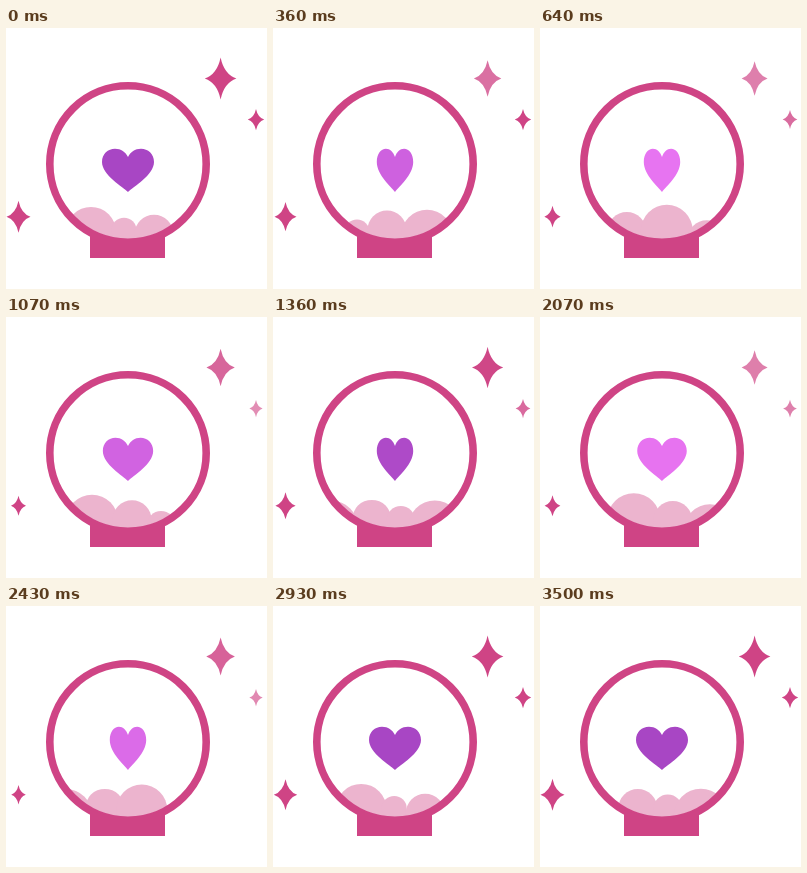
An HTML page for the animation above (3570 ms loop, 261x261 px).

```html
<!DOCTYPE html>
<html lang="en">
<head>
<meta charset="utf-8">
<title>Crystal ball</title>
<style>
  html, body { margin: 0; height: 100%; overflow: hidden; background: #fff; }
  svg { display: block; width: 100vw; height: 100vh; }
</style>
</head>
<body>
<svg viewBox="0 0 261 261" fill="#cf4485">
  <defs>
    <clipPath id="ball"><circle cx="122" cy="136" r="75"/></clipPath>
    <path id="star" d="M0-1Q.22-.2 1 0Q.22.2 0 1Q-.22.2-1 0Q-.22-.2 0-1Z"/>
  </defs>
  <g clip-path="url(#ball)">
    <g id="clouds" opacity=".4"><rect x="80" y="204" width="84" height="10"/></g>
  </g>
  <circle cx="122" cy="136" r="78.2" fill="none" stroke="#cf4485" stroke-width="7.6"/>
  <path d="M84 204Q122 218 159 204V230H84Z"/>
  <path id="heart" d="M0 164C-5 159-26 147-26 134C-26 126-20 120.8-13 120.8C-7 120.8-2.5 124 0 129C2.5 124 7 120.8 13 120.8C20 120.8 26 126 26 134C26 147 5 159 0 164Z"/>
  <use id="big" href="#star"/>
  <use id="small" href="#star"/>
  <use id="left" href="#star"/>
</svg>
<script>
const LOOP = 3570, STEPS = 50, FPS = 14;
const CLOUD_SPEED = 95.2;
// [x at time zero, radius]
const puffs = [[85, 25], [118, 12.5], [148, 19.5], [188, 26], [228, 19.5],
  [257, 14], [291, 26.5], [330, 19.5], [367, 25.5], [400, 12.5],
  [431, 19.5], [461, 14.5], [494, 27]];

const $ = id => document.getElementById(id);

const circles = puffs.map(([, r]) => {
  const c = document.createElementNS('http://www.w3.org/2000/svg', 'circle');
  c.setAttribute('r', r);
  return $('clouds').appendChild(c);
});

// A run of equal pulses, 0 to 1 and back; zero outside the run
function pulse(t, start, period, count, power) {
  const p = (t - start) / period;
  return p <= 0 || p >= count ? 0 : Math.abs(Math.sin(Math.PI * p)) ** power;
}

function star(id, x, y, w, h, scale, opacity) {
  $(id).setAttribute('transform', `translate(${x} ${y}) scale(${w * scale} ${h * scale})`);
  $(id).setAttribute('opacity', opacity);
}

function mix(a, b, k) {
  return `rgb(${a.map((v, i) => Math.round(v + (b[i] - v) * k))})`;
}

function draw(t) {
  // Puffs ride over a shallow arc
  puffs.forEach(([x0], i) => {
    const x = x0 - t * CLOUD_SPEED;
    circles[i].setAttribute('cx', x);
    circles[i].setAttribute('cy', 202 + 0.003 * (x - 110) ** 2);
  });

  const squeeze = Math.min(1, 1.3 * pulse(t, 0, 0.98, 3, 2));
  const glow = pulse(t, 0, 1.45, 2, 1.5);
  $('heart').setAttribute('transform', `translate(122 0) scale(${1 - 0.3 * squeeze} 1)`);
  $('heart').setAttribute('fill', mix([168, 70, 196], [233, 117, 242], glow));

  const a = pulse(t, 0, 1.33, 2, 1);
  const b = pulse(t, 0.35, 1.29, 2, 1.5);
  const c = pulse(t, 0.2, 1.4, 2, 1.5);
  star('big', 214.6, 50.5, 15.8, 21, 1 - 0.18 * a, 1 - 0.32 * a);
  star('small', 250, 91.6, 8.2, 10.6, 1 - 0.2 * b, 1 - 0.4 * b);
  star('left', 12.5, 188.7, 12, 16, 1 - 0.42 * c, 1);
}

const begin = performance.now();
function tick() {
  const ms = (performance.now() - begin) % LOOP;
  const step = Math.min(STEPS - 1, Math.floor((ms + 3) * FPS / 1000));
  draw(step / FPS);
  requestAnimationFrame(tick);
}
tick();
</script>
</body>
</html>
```
